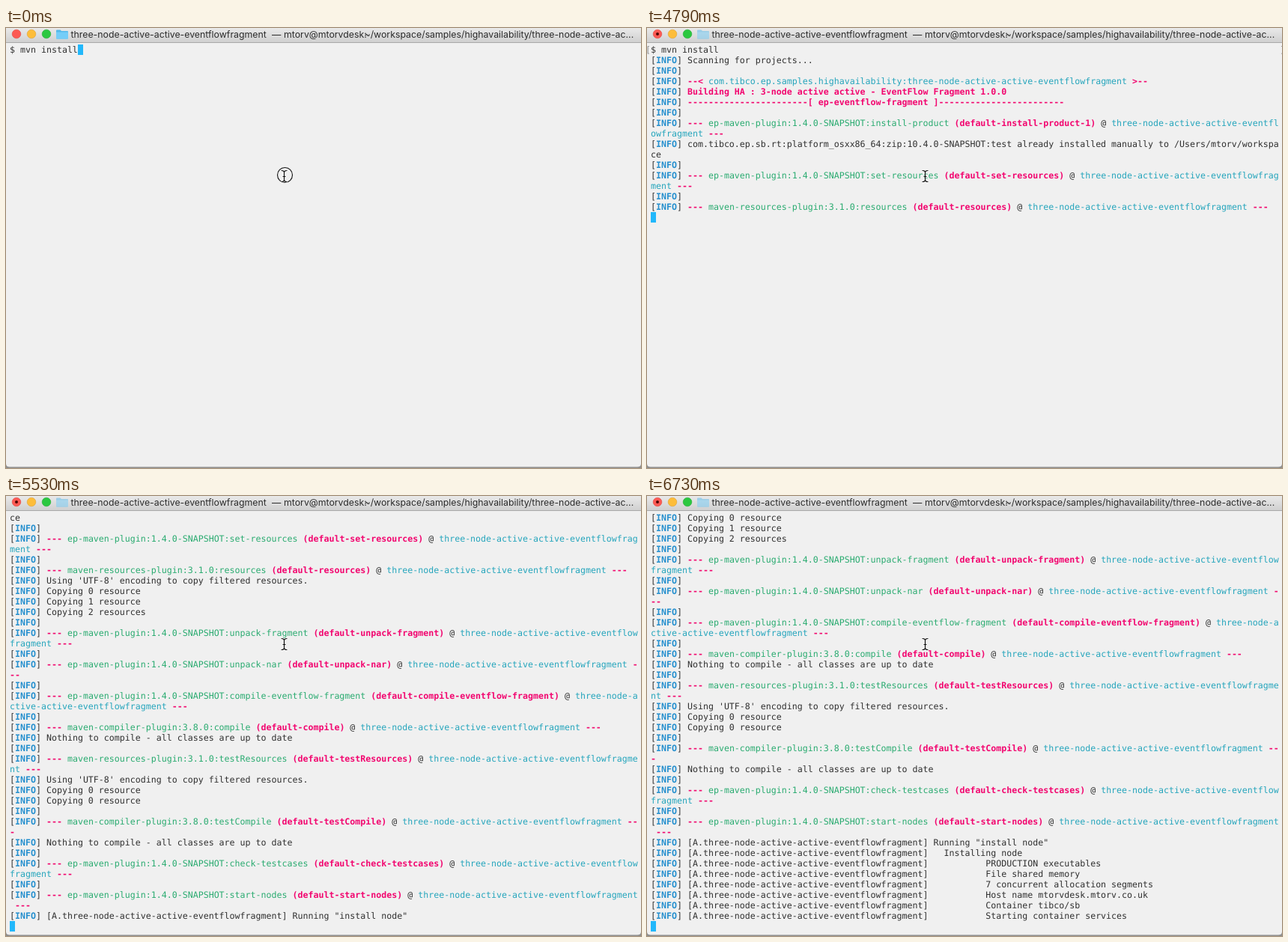
An HTML page that plays this animation: 848x588 px, repeating every 8 s.

```html
<!DOCTYPE html>
<html lang="en">
<head>
<meta charset="utf-8">
<title>Terminal build</title>
<style>
  html, body { margin: 0; width: 100%; height: 100%; overflow: hidden; background: #f0f0f0; }
  #stage { position: relative; width: 848px; height: 588px; overflow: hidden; background: #f0f0f0; }
  #bar {
    position: absolute; left: 0; top: 0; width: 848px; height: 19px;
    background: linear-gradient(#e9e9e9, #d0d0d0); border-bottom: 1px solid #a9a9a9;
    font: 12.32px/19px Inter, Roboto, sans-serif; color: #2c2c2c;
  }
  #bar span { position: absolute; top: -1px; white-space: pre; }
  svg { position: absolute; left: 0; top: 0; }
  #screen, #marks {
    position: absolute; left: 5px; top: 22px; white-space: pre; color: #303030;
    font: 11.627px/14px "DejaVu Sans Mono", "Liberation Mono", monospace;
    text-rendering: geometricPrecision; font-variant-ligatures: none;
  }
  #screen div { height: 14px; }
  #marks { color: #8c8c8c; }
  #marks span { position: absolute; top: 0; }
  #caret { position: absolute; width: 7px; height: 14px; background: #22b8fb; }
  .info { color: #258fce; font-weight: bold; }
  .pink { color: #f2066f; font-weight: bold; }
  .cyan { color: #25a5bc; }
  .green { color: #2aab70; }
</style>
</head>
<body>
<div id="stage">
  <div id="bar">
    <span style="left:86.5px">three-node-active-active-eventflowfragment</span>
    <span style="left:355px">—</span>
    <span style="left:371px">mtorv@mtorvdesk:</span>
    <span style="left:478.5px">~/workspace/samples/highavailability/three-node-active-ac...</span>
  </div>
  <div id="caret"></div>
  <div id="marks"><span style="left:-7px">[</span><span style="left:840px">]</span></div>
  <div id="screen"></div>
  <svg width="848" height="588" viewBox="0 0 848 588">
    <g stroke-width=".6">
      <circle cx="14" cy="8" r="5.8" fill="#fc5a54" stroke="#e2453f"/>
      <circle cx="34" cy="8" r="5.8" fill="#fdbd3a" stroke="#e0a030"/>
      <circle cx="54" cy="8" r="5.8" fill="#2bc840" stroke="#1fac32"/>
    </g>
    <circle id="dot" cx="14" cy="8" r="2" fill="#4d0603"/>
    <g id="folder">
      <path d="M67 3.5q0-1 1-1h4.500l1.500 1.500h8q1 0 1 1v8.500q0 1-1 1h-14q-1 0-1-1z" fill="#55b9ea"/>
      <path d="M67 5.500h16v8q0 1-1 1h-14q-1 0-1-1z" fill="#74cdf8"/>
    </g>
    <circle id="ring" cx="372.500" cy="196.500" r="10" fill="none" stroke="#111" stroke-width="1.100"/>
    <g fill="none" stroke-linecap="round">
      <path d="M368 190.500q3 0 3.500 2q.5-2 3.500-2M371.500 192v12M368 205.500q3 0 3.500-2q.5 2 3.500 2M369.500 198.500h4" stroke="#fff" stroke-width="2.400" opacity=".7"/>
      <path d="M368 190.500q3 0 3.500 2q.5-2 3.500-2M371.500 192v12M368 205.500q3 0 3.500-2q.5 2 3.500 2M370 198.500h3" stroke="#111" stroke-width="1.200"/>
    </g>
    <path d="M0 582v6h848v-6q0 4.500-5 4.500h-838q-5 0-5-4.500z" fill="#8f8f8f"/>
  </svg>
</div>
<script>
const COLS = 120, ROWS = 40, CELL = 7, LINE = 14, LOOP = 8000;
const PROJECT = 'three-node-active-active-eventflowfragment';
const el = id => document.getElementById(id);

// Each log line is a list of [class, text] runs.
const info = (...runs) => [['', '['], ['info', 'INFO'], ['', ']'], ...runs];
const blank = info();
const say = text => info(['', ' ' + text]);
const pink = text => info(['pink', ' ' + text]);
const goal = (plugin, name, id = name) => info(
  ['pink', ' --- '], ['green', plugin + ':' + name], ['pink', ` (default-${id})`],
  ['', ' @ '], ['cyan', PROJECT], ['pink', ' ---']);
const ep = (name, id) => goal('ep-maven-plugin:1.4.0-SNAPSHOT', name, id);
const res = name => goal('maven-resources-plugin:3.1.0', name);
const javac = name => goal('maven-compiler-plugin:3.8.0', name);
const node = text => say(`[A.${PROJECT}] ${text}`);
const detail = text => node(' '.repeat(10) + text);
const encoding = say("Using 'UTF-8' encoding to copy filtered resources.");
const copying = n => say(`Copying ${n} resource${n > 1 ? 's' : ''}`);
const upToDate = say('Nothing to compile - all classes are up to date');

const log = [
  [['', '$ mvn install']],
  say('Scanning for projects...'),
  blank,
  info(['pink', ' --< '], ['cyan', 'com.tibco.ep.samples.highavailability:' + PROJECT], ['pink', ' >--']),
  pink('Building HA : 3-node active active - EventFlow Fragment 1.0.0'),
  pink('-'.repeat(23) + '[ ep-eventflow-fragment ]' + '-'.repeat(24)),
  blank, ep('install-product', 'install-product-1'),
  say('com.tibco.ep.sb.rt:platform_osxx86_64:zip:10.4.0-SNAPSHOT:test already installed manually to /Users/mtorv/workspace'),
  blank, ep('set-resources'),
  blank, res('resources'), encoding, copying(0), copying(1), copying(2),
  blank, ep('unpack-fragment'),
  blank, ep('unpack-nar'),
  blank, ep('compile-eventflow-fragment'),
  blank, javac('compile'), upToDate,
  blank, res('testResources'), encoding, copying(0), copying(0),
  blank, javac('testCompile'), upToDate,
  blank, ep('check-testcases'),
  blank, ep('start-nodes'),
  node('Running "install node"'),
  node('  Installing node'),
  detail('PRODUCTION executables'),
  detail('File shared memory'),
  detail('7 concurrent allocation segments'),
  detail('Host name mtorvdesk.mtorv.co.uk'),
  detail('Container tibco/sb'),
  detail('Starting container services')
];

// Hard wrap at the terminal width, as a terminal does.
function wrap(runs) {
  const rows = [[]];
  let room = COLS;
  for (let [cls, text] of runs) {
    while (text) {
      if (!room) { rows.push([]); room = COLS; }
      const part = text.slice(0, room);
      rows[rows.length - 1].push([cls, part]);
      room -= part.length;
      text = text.slice(part.length);
    }
  }
  return rows;
}
const rows = log.flatMap(wrap);

// [start time, row of the caret]
const steps = [
  [0, 0], [150, 1], [1050, 2], [2250, 6], [2690, 9], [4790, 16], [4940, 26],
  [5090, 31], [5380, 48], [5530, 49], [5680, 50], [6430, 55], [6730, 56]
];

function rowNode(runs) {
  const div = document.createElement('div');
  for (const [cls, text] of runs) {
    const span = document.createElement('span');
    span.className = cls;
    span.textContent = text;
    div.append(span);
  }
  return div;
}

function show(end) {
  const top = Math.max(0, end - ROWS + 1), typing = end === 0;
  el('screen').replaceChildren(...rows.slice(top, Math.max(1, end)).map(rowNode));
  el('caret').style.left = 5 + (typing ? 13 * CELL : 0) + 'px';
  el('caret').style.top = 22 + (end - top) * LINE + 'px';
  el('marks').style.display = typing || top ? 'none' : '';
  el('ring').style.display = typing ? '' : 'none';
  el('dot').style.display = typing ? 'none' : '';
  el('folder').style.opacity = typing ? 1 : 0.5;
}

let shown = -1;
const start = performance.now();
function tick() {
  const t = (performance.now() - start) % LOOP;
  const end = steps.filter(s => s[0] <= t).pop()[1];
  if (end !== shown) show(shown = end);
  requestAnimationFrame(tick);
}
tick();
</script>
</body>
</html>
```
